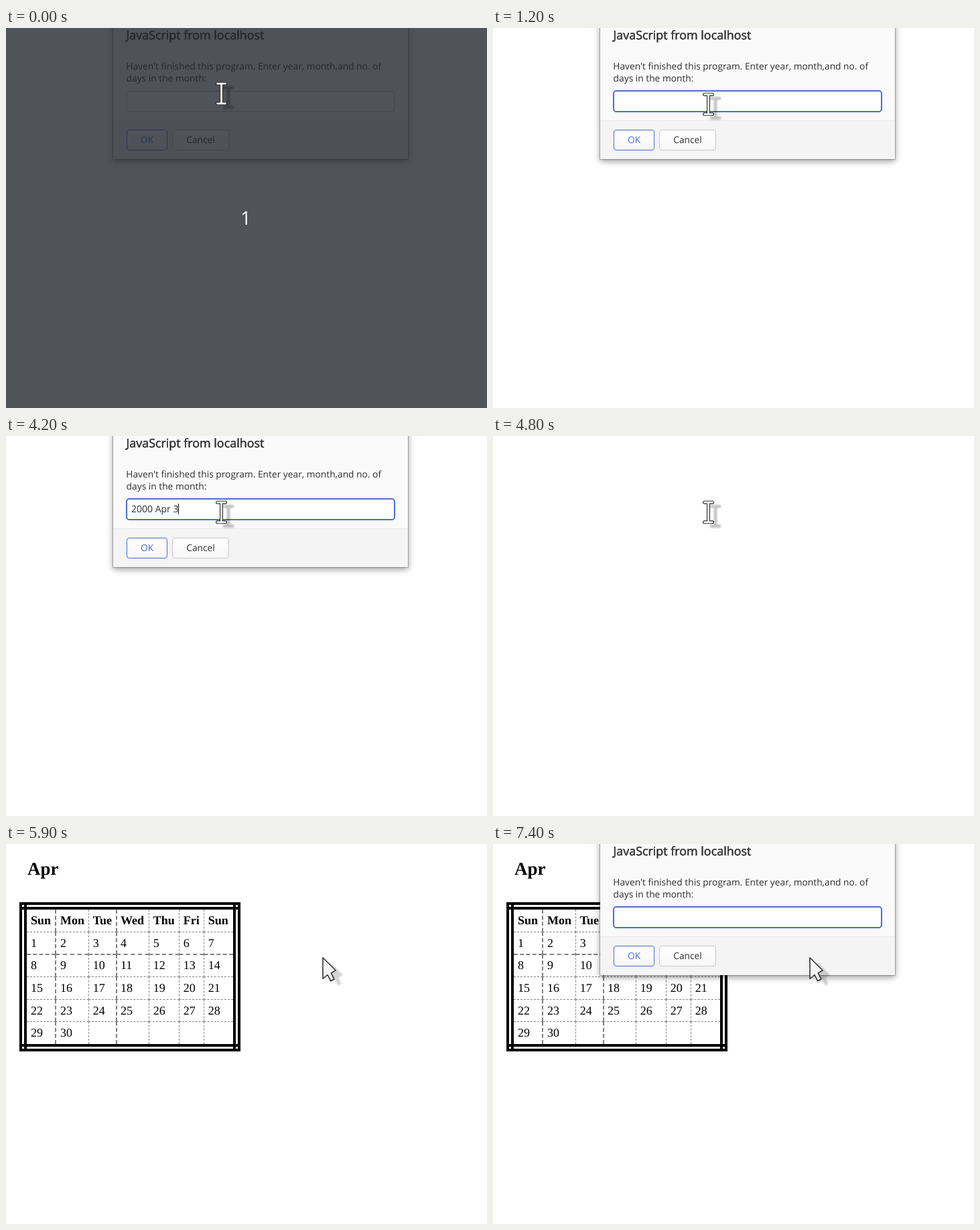
Animation of 718 by 568 pixels, one loop 8000 ms. Source, as an HTML page with a canvas:

```html
<!DOCTYPE html>
<html lang="en">
<head>
<meta charset="utf-8">
<title>Calendar prompt</title>
<style>
  html, body { margin: 0; width: 100%; height: 100%; overflow: hidden; background: #fff; }
  canvas { display: block; width: 718px; height: 568px; }
</style>
</head>
<body>
<canvas id="stage" width="718" height="568"></canvas>
<script>
const W = 718, H = 568, LOOP = 8000;
const ctx = document.getElementById('stage').getContext('2d');
const SANS = '"Open Sans", "Noto Sans", sans-serif';
const SERIF = '"Liberation Serif", "Noto Serif", serif';
const INK = '#2c2d2e', BLUE = '#4a6dd0';

// Typed text: [time, characters entered so far]
const ENTRY = '2000 Apr 30';
const KEYS = [[1400, 1], [1500, 2], [1700, 3], [1800, 4], [2300, 5], [2800, 6],
              [3000, 7], [3200, 8], [3400, 9], [4200, 10], [4500, 11]];
const CARET_OFF = [[1200, 1400], [3800, 4200], [7400, LOOP]];

// Cursor path: [time, x, y, kind]
const POINTER = [[0, 321.5, 81, 'beam'], [200, 321.5, 92, 'beam'], [400, 321.5, 97, 'beam'],
                 [5800, 400, 143, 'arrow'], [5900, 473, 170, 'arrow']];

const COLS = [31, 74, 123.5, 165, 213.5, 258.5, 295.5, 339];
const ROWS = [98, 131.5, 165, 198.5, 232.5, 265.5, 299];
const DAYS = ['Sun', 'Mon', 'Tue', 'Wed', 'Thu', 'Fri', 'Sun'];

const latest = (list, t) => list.filter(k => k[0] <= t).pop();

function text(str, x, y, font, color = INK, align = 'left') {
  ctx.font = font;
  ctx.fillStyle = color;
  ctx.textAlign = align;
  ctx.fillText(str, x, y);
}

function box(x, y, w, h, r, fill, stroke, line = 1) {
  ctx.beginPath();
  ctx.roundRect(x, y, w, h, r);
  ctx.fillStyle = fill;
  ctx.fill();
  ctx.lineWidth = line;
  ctx.strokeStyle = stroke;
  ctx.stroke();
}

// Dashes that begin and end exactly on the segment's ends
function dashed(x1, y1, x2, y2, width) {
  const len = Math.hypot(x2 - x1, y2 - y1), dash = 3 * width, gap = 2 * width;
  const n = Math.floor((len + gap) / (dash + gap));
  const loose = (len - n * dash) / (n - 1), tight = (len - (n + 1) * dash) / n;
  const best = tight > 0 && Math.abs(tight - gap) <= Math.abs(loose - gap) ? tight : loose;
  ctx.setLineDash([dash, best]);
  ctx.lineWidth = width;
  ctx.beginPath();
  ctx.moveTo(x1, y1);
  ctx.lineTo(x2, y2);
  ctx.stroke();
  ctx.setLineDash([]);
}

function calendar() {
  text('Apr', 32, 46, `bold 27px ${SERIF}`, '#000');
  ctx.strokeStyle = '#808080';
  ctx.lineCap = 'butt';
  for (let c = 1; c < 7; c++)
    for (let r = 0; r < 6; r++)
      dashed(COLS[c], ROWS[r], COLS[c], ROWS[r + 1], c === 1 || c === 3 ? 2 : 1);
  for (let r = 1; r < 6; r++)
    for (let c = 0; c < 7; c++)
      dashed(COLS[c], ROWS[r], COLS[c + 1], ROWS[r], r === 2 ? 2 : 1);
  ctx.fillStyle = '#000';
  for (const x of [20, 27, 339, 346]) ctx.fillRect(x, 87, 4, 223);
  for (const y of [87, 94, 299, 306]) ctx.fillRect(20, y, 330, 4);
  const left = c => Math.floor(COLS[c]) + (c === 1 ? 7 : 6) + (c > 1 && COLS[c] % 1 ? 0.7 : 0);
  DAYS.forEach((d, c) => text(d, left(c), 120, `bold 18px ${SERIF}`, '#000'));
  for (let d = 0; d < 30; d++) {
    const row = Math.floor(d / 7);
    text(d + 1, left(d % 7), Math.round(153.8 + row * 33.6), `18px ${SERIF}`, '#000');
  }
}

function button(label, x, w, edge, color) {
  const g = ctx.createLinearGradient(0, 152, 0, 183);
  g.addColorStop(0, '#ffffff');
  g.addColorStop(1, '#f7f7f7');
  box(x + 0.5, 152.5, w - 1, 30, 3.5, g, edge);
  text(label, x + w / 2, 172, `13.77px ${SANS}`, color, 'center');
}

function field(focused, entry, caret) {
  if (focused) {
    box(180, 94, 400, 31, 4, '#fff', BLUE, 2);
  } else {
    box(180.5, 94.5, 399, 30, 3.5, '#fff', '#c6c6c6');
    ctx.fillStyle = 'rgba(0,0,0,.05)';
    ctx.fillRect(182, 95, 396, 1);
  }
  text(entry, 187, 114, `14px ${SANS}`);
  if (caret) {
    const x = Math.floor(187 + ctx.measureText(entry).width);
    ctx.fillStyle = '#111';
    ctx.fillRect(x, 101, 1, 16);
  }
}

function dialog(focused, entry, caret) {
  const alpha = ctx.globalAlpha;
  ctx.save();
  ctx.shadowColor = `rgba(0,0,0,${0.42 * alpha})`;
  ctx.shadowBlur = 9;
  ctx.shadowOffsetY = 3;
  ctx.fillStyle = '#fafafa';
  ctx.fillRect(160, -20, 440, 216);
  ctx.restore();
  ctx.strokeStyle = 'rgba(0,0,0,.24)';
  ctx.lineWidth = 1;
  ctx.strokeRect(159.5, -20.5, 441, 217);
  ctx.fillStyle = '#f4f4f4';
  ctx.fillRect(160, 139, 440, 57);
  ctx.fillStyle = '#e8e8e8';
  ctx.fillRect(160, 138, 440, 1);

  const title = 'JavaScript from localhost';
  text(title, 179.5, 17, `17.9px ${SANS}`);
  ctx.strokeStyle = INK;
  ctx.lineWidth = 0.5;
  ctx.strokeText(title, 179.5, 17);

  const body = `13.77px ${SANS}`;
  text("Haven't finished this program. Enter year, month,and no. of", 179.3, 62, body);
  text('days in the month:', 179.6, 80, body);
  field(focused, entry, caret);
  button('OK', 180, 61, BLUE, BLUE);
  button('Cancel', 248, 85, '#c8c8c8', INK);
}

function beamPath() {
  ctx.beginPath();
  ctx.moveTo(-6, 2.2);
  ctx.lineTo(6, 2.2);
  ctx.moveTo(0, 2.6);
  ctx.lineTo(0, 31.4);
  ctx.moveTo(-6, 31.8);
  ctx.lineTo(6, 31.8);
}

function beam() {
  ctx.lineCap = ctx.lineJoin = 'round';
  const trace = (color, width) => {
    beamPath();
    ctx.strokeStyle = color;
    ctx.lineWidth = width;
    ctx.stroke();
  };
  ctx.save();
  ctx.translate(10.5, 6);
  ctx.filter = 'blur(1px)';
  trace('rgba(0,0,0,.23)', 5);
  ctx.restore();
  trace('#2a2a2a', 5);
  trace('#fff', 2.8);
}

function arrow() {
  const shape = new Path2D('M0 0V31.5L7 25.5L11.6 34.6L16.8 32.2L12.4 23L19 18.8Z');
  ctx.save();
  ctx.translate(11, 7);
  ctx.filter = 'blur(1px)';
  ctx.fillStyle = 'rgba(0,0,0,.17)';
  ctx.fill(shape);
  ctx.restore();
  const g = ctx.createLinearGradient(0, 0, 10, 34);
  g.addColorStop(0, '#ffffff');
  g.addColorStop(1, '#ececec');
  ctx.fillStyle = g;
  ctx.fill(shape);
  ctx.lineJoin = 'round';
  ctx.lineWidth = 1.6;
  ctx.strokeStyle = '#333';
  ctx.stroke(shape);
}

function draw(t) {
  ctx.globalAlpha = 1;
  ctx.textRendering = 'geometricPrecision';
  ctx.fillStyle = '#fff';
  ctx.fillRect(0, 0, W, H);

  if (t >= 5000) calendar();

  if (t < 4800 || t >= 6800) {
    const key = t < 4800 && latest(KEYS, t);
    const caret = t >= 700 && !CARET_OFF.some(([a, b]) => t >= a && t < b);
    ctx.globalAlpha = t >= 6800 ? Math.min(1, 0.3 + 0.4 * Math.floor((t - 6800) / 100)) : 1;
    dialog(t >= 700, key ? ENTRY.slice(0, key[1]) : '', caret);
    ctx.globalAlpha = 1;
  }

  if (t < 100) {
    ctx.fillStyle = 'rgba(35,38,47,.79)';
    ctx.fillRect(0, 0, W, H);
    text('1', 358, 294, `28px ${SANS}`, '#fff', 'center');
  }

  const [, x, y, kind] = latest(POINTER, t);
  ctx.save();
  ctx.translate(x, y);
  kind === 'beam' ? beam() : arrow();
  ctx.restore();
}

function tick() {
  draw(performance.now() % LOOP);
  requestAnimationFrame(tick);
}
tick();
</script>
</body>
</html>
```
